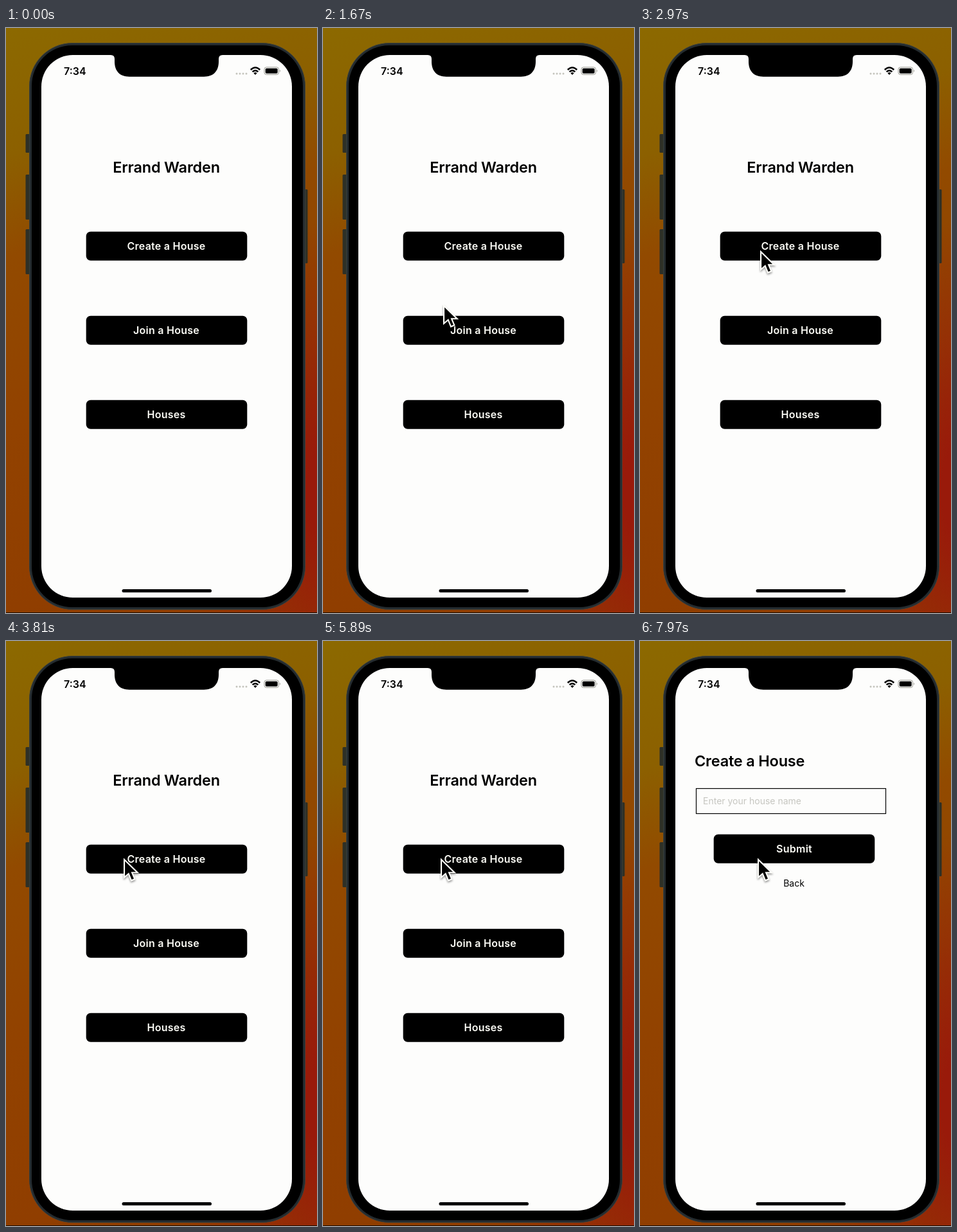
Write an HTML page that moves like this. It is 484 by 910 pixels and loops after 7.99 s.

```html
<!DOCTYPE html>
<html lang="en">
<head>
<meta charset="utf-8">
<title>House chores</title>
<style>
  html, body { margin: 0; width: 100%; height: 100%; overflow: hidden; }
  body {
    background:
      radial-gradient(ellipse 300px 430px at 545px 720px, #991a0a 25%, #97260899 62%, #93400000 100%),
      linear-gradient(164deg, #8c6900 0%, #8c6000 19%, #924a00 34%, #924200 60%, #8f3c00 100%);
  }
  svg { display: block; width: 484px; height: 910px; }
  text { font-family: Inter, "Open Sans", sans-serif; }
  .title { font-size: 23.5px; font-weight: 600; letter-spacing: -.2px; }
  .label { font-size: 16px; font-weight: 600; letter-spacing: .25px; fill: #fcfcf6; text-anchor: middle; }
  .small { font-size: 14px; }
  .center { text-anchor: middle; }

  .menu, .form, .cursor { animation: 7990ms linear infinite; }
  .menu { animation-name: leave; }
  .form { animation-name: enter; }
  .cursor { animation-name: point; filter: drop-shadow(0 2px 1.5px #0006); }

  @keyframes leave { 0%, 78.09% { visibility: visible; } 78.1%, 100% { visibility: hidden; } }
  @keyframes enter { 0%, 78.09% { visibility: hidden; } 78.1%, 100% { visibility: visible; } }
  @keyframes point {
    0%, 10.9% { transform: translate(4px, 858px); visibility: hidden; }
    10.91% { transform: translate(4px, 858px); visibility: visible; }
    12.14% { transform: translate(34px, 797px); }
    16.3% { transform: translate(140px, 556px); }
    18.5% { transform: translate(179px, 455px); }
    20.4%, 23% { transform: translate(187px, 430px); animation-timing-function: ease-in-out; }
    31%, 41% { transform: translate(187px, 346px); animation-timing-function: ease-in-out; }
    46%, 100% { transform: translate(183px, 338px); visibility: visible; }
  }
</style>
</head>
<body>
<svg viewBox="0 0 484 910">
  <rect y="909" width="484" height="1" fill="#1c0c00"/>

  <!-- phone -->
  <g fill="#2e3026">
    <rect x="30.5" y="165" width="8" height="29" rx="1.5"/>
    <rect x="30.5" y="228" width="8" height="70" rx="1.5"/>
    <rect x="30.5" y="313" width="8" height="70" rx="1.5"/>
    <rect x="463" y="251" width="6.5" height="115" rx="1.5"/>
  </g>
  <rect x="36.5" y="23.5" width="429" height="881" rx="67" fill="#242b2f" stroke="#3a403c"/>
  <rect x="40" y="27" width="422" height="874" rx="63"/>
  <rect x="55" y="42" width="390" height="844" rx="49" fill="#fdfdfc"/>
  <path d="M163 41.5V42Q169 42 169 48V52C169 67 177 75.7 192 75.7H308C323 75.7 331 67 331 52V48Q331 42 337 42V41.5Z"/>
  <rect x="180.5" y="873" width="139.5" height="5" rx="2.5"/>

  <!-- status bar -->
  <text x="90" y="72.5" font-size="16" font-weight="600">7:34</text>
  <path d="M359 71H376" stroke="#c4c4bc" stroke-width="3" stroke-linecap="round" stroke-dasharray="0 5"/>
  <g fill="none" stroke="#000" stroke-width="2.5">
    <path d="M380.8 65Q388 58 395.2 65"/>
    <path d="M383.6 68.2Q388 64 392.4 68.2"/>
  </g>
  <path d="M385.4 70.2Q388 68 390.6 70.2L388 73Z"/>
  <rect x="402" y="61" width="22.5" height="11.5" rx="3.3" fill="none" stroke="#98988f"/>
  <rect x="403.7" y="62.7" width="19" height="8" rx="1.8"/>
  <path d="M426 65Q428 66.7 426 68.5Z" fill="#98988f"/>

  <g class="menu">
    <text class="title center" x="249.5" y="225">Errand Warden</text>
    <rect x="124.7" y="316.7" width="250.6" height="45" rx="7"/>
    <text class="label" x="249.5" y="345">Create a House</text>
    <rect x="124.7" y="447.7" width="250.6" height="45" rx="7"/>
    <text class="label" x="249.5" y="476">Join a House</text>
    <rect x="124.7" y="578.7" width="250.6" height="45" rx="7"/>
    <text class="label" x="249.5" y="607">Houses</text>
  </g>

  <g class="form">
    <text class="title" x="85" y="195">Create a House</text>
    <rect x="87.5" y="229.5" width="295" height="39" fill="none" stroke="#000" stroke-width="1.2"/>
    <text class="small" x="98" y="254" fill="#c6c6c0">Enter your house name</text>
    <rect x="114.7" y="300.7" width="250.6" height="45" rx="7"/>
    <text class="label" x="240" y="329">Submit</text>
    <text class="small center" x="239.5" y="381.5">Back</text>
  </g>

  <g class="cursor">
    <path transform="scale(1.06)" d="M1 1.8V28L7.3 22.6L11.4 32.6L16.4 30.5L12.4 21H20.5Z" stroke="#fffffa" stroke-width="2"/>
  </g>
</svg>
</body>
</html>
```
